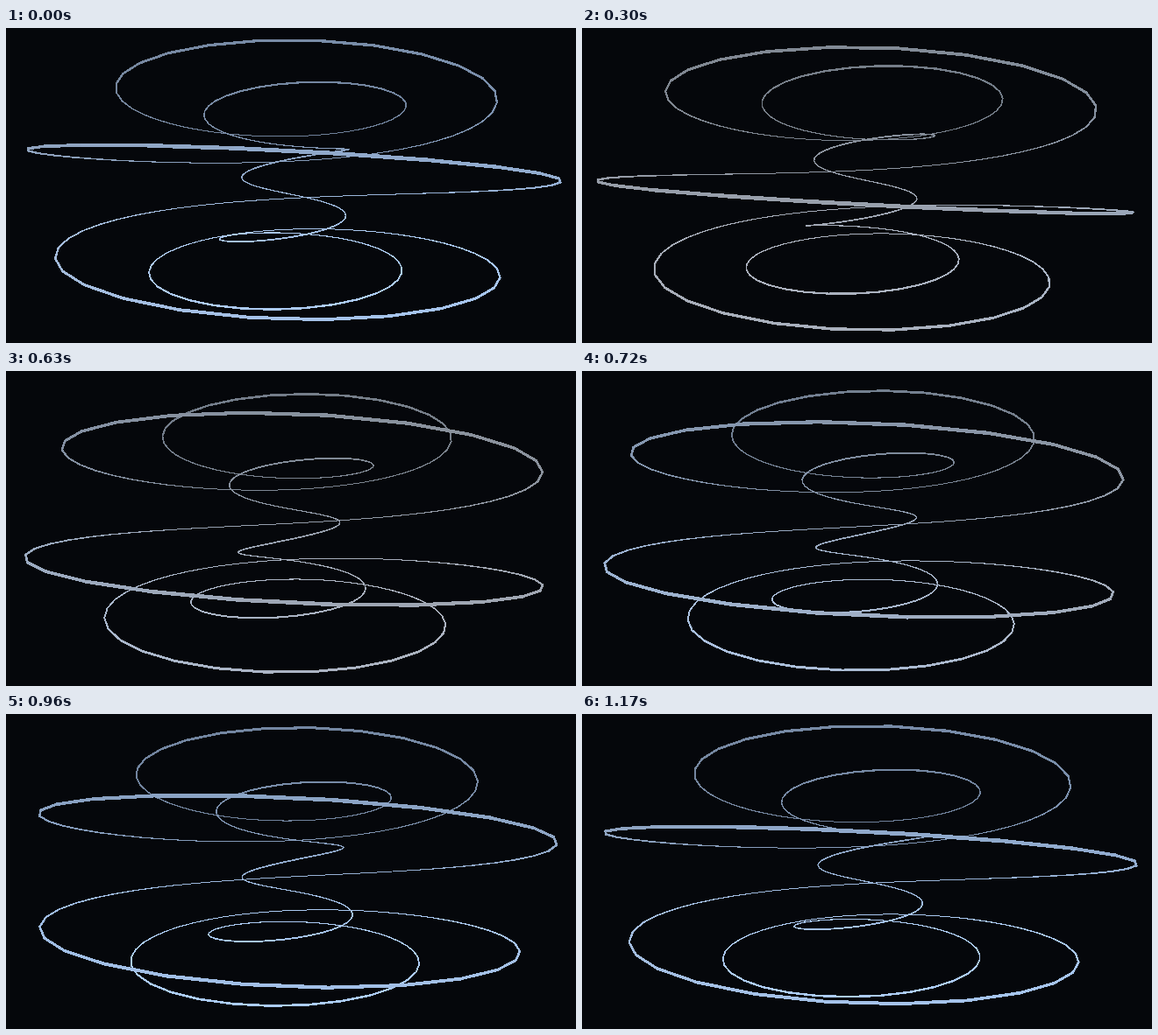
An HTML page that plays this animation: 650x360 px, repeating every 1.2 s.

```html
<!DOCTYPE html>
<html lang="en">
<head>
<meta charset="utf-8">
<title>Rotating torus coil</title>
<style>
  html, body { margin: 0; width: 100%; height: 100%; overflow: hidden; background: #05070b; }
  svg { display: block; width: 650px; height: 360px; }
  line { stroke-linecap: round; shape-rendering: crispEdges; }
</style>
</head>
<body>
<svg id="stage" viewBox="0 0 650 360"></svg>
<script>
const LOOP = 1200, FRAMES = 40;
const TURNS = 7, PER_TURN = 40, COUNT = TURNS * PER_TURN;
const CX = 325, CY = 180;
const FOCAL = CY / Math.tan(Math.PI / 6);   // 60 degree field of view
const MAJOR = 0.4395, MINOR = 0.264;        // torus radii, camera distance = 1
const START = 58 * Math.PI / 180;
const LINE = 1.45;
const BLUE = [[110, 128, 154], [172, 204, 246]];
const GRAY = [[116, 124, 134], [172, 178, 190]];

const stage = document.getElementById("stage");
const lines = Array.from({ length: COUNT }, () =>
  stage.appendChild(document.createElementNS("http://www.w3.org/2000/svg", "line")));

const mix = (a, b, k) => a + (b - a) * k;

function project(i, turn) {
  const around = i / COUNT * 2 * Math.PI;
  const angle = TURNS * around + START - turn;
  const radius = MAJOR + MINOR * Math.cos(around);
  const height = Math.sin(around);
  const depth = 1 - radius * Math.cos(angle);
  return {
    x: CX + FOCAL * radius * Math.sin(angle) / depth,
    y: CY + FOCAL * MINOR * height / depth,
    depth, height
  };
}

// A grey tint sweeps from left to right once per loop; lower parts are brighter.
function tint(x, height, phase) {
  const peak = 0.37 + 0.08 * (x - CX) / 308;
  const wave = 0.5 + 0.5 * Math.cos(2 * Math.PI * (phase - peak));
  const gray = wave * wave * (3 - 2 * wave);
  const light = Math.pow(Math.max(0, (1 + height) / 2), 0.7);
  const rgb = [0, 1, 2].map(c => Math.round(mix(
    mix(BLUE[0][c], BLUE[1][c], light),
    mix(GRAY[0][c], GRAY[1][c], light), gray)));
  return `rgb(${rgb})`;
}

function draw(time) {
  const phase = Math.floor(time % LOOP / LOOP * FRAMES) / FRAMES;
  const points = Array.from({ length: COUNT }, (_, i) => project(i, phase * 2 * Math.PI));
  const parts = points.map((a, i) => {
    const b = points[(i + 1) % COUNT];
    return { a, b, depth: (a.depth + b.depth) / 2 };
  });
  parts.sort((p, q) => q.depth - p.depth);
  parts.forEach(({ a, b, depth }, i) => {
    const el = lines[i];
    el.setAttribute("x1", a.x.toFixed(2));
    el.setAttribute("y1", a.y.toFixed(2));
    el.setAttribute("x2", b.x.toFixed(2));
    el.setAttribute("y2", b.y.toFixed(2));
    el.setAttribute("stroke-width", Math.max(1, LINE / depth).toFixed(2));
    el.setAttribute("stroke", tint((a.x + b.x) / 2, (a.height + b.height) / 2, phase));
  });
}

const begin = performance.now();
function tick() {
  draw(performance.now() - begin);
  requestAnimationFrame(tick);
}
tick();
</script>
</body>
</html>
```
